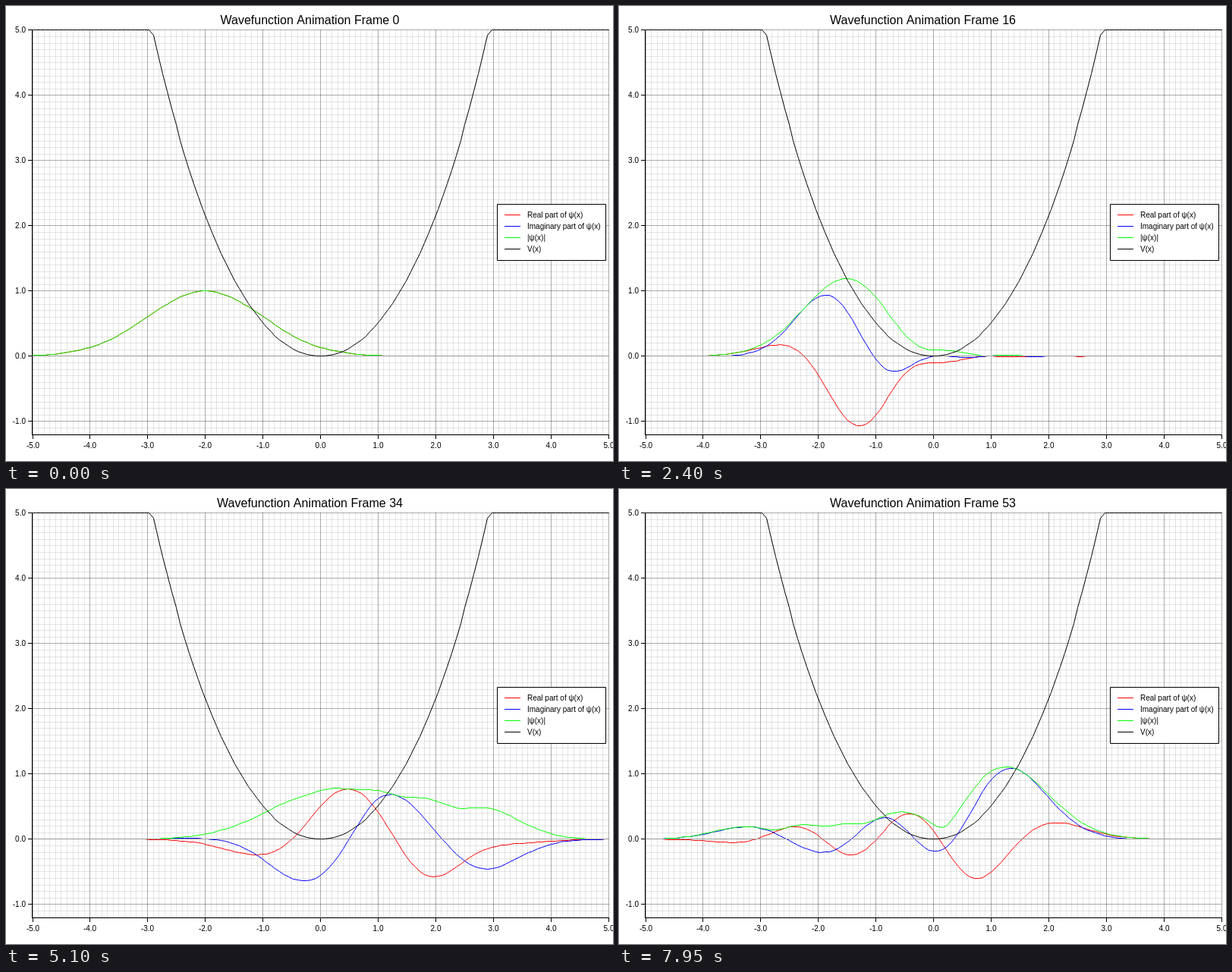
An HTML page with a canvas for the animation above (8000 ms loop, 800 by 600 pixels).

```html
<!DOCTYPE html>
<html lang="en">
<head>
<meta charset="utf-8">
<title>Wavefunction Animation</title>
<style>
  html, body { margin: 0; width: 100%; height: 100%; overflow: hidden; background: #fff; }
  canvas { display: block; }
</style>
</head>
<body>
<canvas id="stage" width="800" height="600"></canvas>
<script>
const ctx = document.getElementById('stage').getContext('2d');
const FONT = '"Liberation Sans", Arial, sans-serif';
const LOOP = 8000, HOLD = 150, FRAMES = 54;

// Quantum particle in an anharmonic well, solved on a periodic grid
const N = 256, DX = 20 / (N - 1), DT = 0.04, STEPS = 10;
const xs = Array.from({ length: N }, (_, i) => (i - N / 2) * DX);
const potential = x => 0.5 * x * x + 0.01 * x ** 4;

function simulate() {
  // Free propagator over DT as a convolution kernel (finite-difference kinetic energy)
  const kr = new Float64Array(N), ki = new Float64Array(N);
  for (let d = 0; d < N; d++) {
    for (let m = -N / 2; m < N / 2; m++) {
      const phase = (1 - Math.cos(2 * Math.PI * m / N)) / DX ** 2 * DT;
      const c = Math.cos(2 * Math.PI * m * d / N) / N;
      kr[d] += c * Math.cos(phase);
      ki[d] -= c * Math.sin(phase);
    }
  }
  const vc = xs.map(x => Math.cos(potential(x) * DT / 2));
  const vs = xs.map(x => Math.sin(potential(x) * DT / 2));
  let re = Float64Array.from(xs, x => Math.exp(-((x + 2) ** 2) / 2));
  let im = new Float64Array(N);

  function kick() {
    for (let i = 0; i < N; i++) {
      const a = re[i], b = im[i];
      re[i] = a * vc[i] + b * vs[i];
      im[i] = b * vc[i] - a * vs[i];
    }
  }
  function drift() {
    const r = new Float64Array(N), s = new Float64Array(N);
    for (let i = 0; i < N; i++) {
      let a = 0, b = 0;
      for (let j = 0; j < N; j++) {
        const d = i > j ? i - j : j - i;
        a += kr[d] * re[j] - ki[d] * im[j];
        b += kr[d] * im[j] + ki[d] * re[j];
      }
      r[i] = a;
      s[i] = b;
    }
    re = r;
    im = s;
  }

  const states = [];
  for (let f = 0; f < FRAMES; f++) {
    states.push({ re: re.slice(), im: im.slice() });
    for (let s = 0; s < STEPS; s++) { kick(); drift(); kick(); }
  }
  return states;
}

// Plot coordinates snap to whole pixels and stay inside the chart
const clamp = (v, lo, hi) => Math.max(lo, Math.min(hi, v));
const px = x => 35.5 + Math.floor((clamp(x, -5, 5) + 5) / 10 * 759 + 1e-3);
const py = y => 564.5 - Math.floor((clamp(y, -1.2, 5) + 1.2) / 6.2 * 533 + 1e-3);

function line(x1, y1, x2, y2, color) {
  ctx.strokeStyle = color;
  ctx.beginPath();
  ctx.moveTo(x1, y1);
  ctx.lineTo(x2, y2);
  ctx.stroke();
}

function text(str, x, y, size, align) {
  ctx.fillStyle = '#000';
  ctx.font = size + 'px ' + FONT;
  ctx.textAlign = align;
  ctx.fillText(str, x, y);
}

function curve(value, color) {
  ctx.strokeStyle = color;
  ctx.beginPath();
  xs.forEach((x, i) => ctx.lineTo(px(x), py(value(i))));
  ctx.stroke();
}

function drawGrid() {
  const grid = (step, color) => {
    for (let i = -50; i <= 50; i += step) line(px(i / 10), 31, px(i / 10), 565, color);
    for (let i = step > 1 ? -10 : -12; i <= 50; i += step) line(35, py(i / 10), 795, py(i / 10), color);
  };
  grid(1, 'rgba(0,0,0,.1)');
  grid(10, 'rgba(0,0,0,.25)');
}

function drawAxes() {
  line(34.5, 31, 34.5, 566, '#000');
  line(34, 565.5, 795, 565.5, '#000');
  for (let i = -5; i <= 5; i++) {
    line(px(i), 566, px(i), 571, '#000');
    text(i.toFixed(1), px(i), 583, 10, 'center');
    if (i < -1) continue;
    line(29, py(i), 34, py(i), '#000');
    text(i.toFixed(1), 26, py(i) + 3.5, 10, 'right');
  }
}

function drawLegend() {
  ctx.fillStyle = '#fff';
  ctx.fillRect(647, 261, 144, 75);
  ctx.strokeStyle = '#000';
  ctx.strokeRect(647.5, 261.5, 143, 74);
  [['Real part of ψ(x)', '#f00'], ['Imaginary part of ψ(x)', '#00f'],
   ['|ψ(x)|', '#0f0'], ['V(x)', '#000']].forEach(([label, color], i) => {
    const y = 275.5 + 15 * i;
    line(657, y, 678, y, color);
    text(label, 687, y + 3.5, 10, 'left');
  });
}

const states = simulate();

function draw(n) {
  const { re, im } = states[n];
  ctx.fillStyle = '#fff';
  ctx.fillRect(0, 0, 800, 600);
  ctx.lineWidth = 1;
  ctx.lineJoin = 'bevel';
  text('Wavefunction Animation Frame ' + n, 400.5, 23.5, 16, 'center');
  drawGrid();
  drawAxes();
  curve(i => re[i], '#f00');
  curve(i => im[i], '#00f');
  curve(i => Math.hypot(re[i], im[i]), '#0f0');
  line(35, py(0), 795, py(0), '#999');
  curve(i => potential(xs[i]), '#000');
  drawLegend();
}

const start = performance.now();
function tick() {
  draw(Math.floor((performance.now() - start) % LOOP / HOLD));
  requestAnimationFrame(tick);
}
tick();
</script>
</body>
</html>
```
